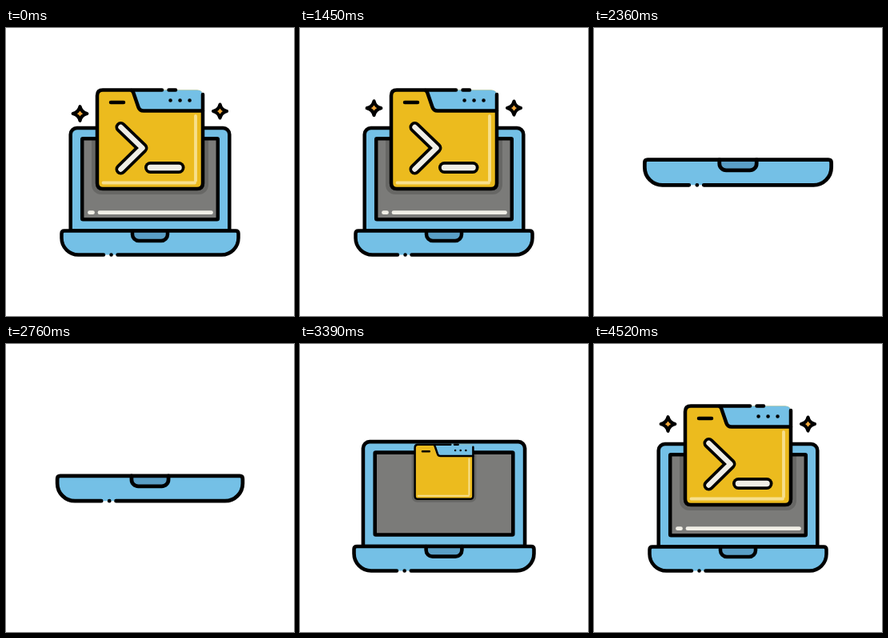
Write an HTML page with a canvas that moves like this. It is 360 px wide and 360 px high and loops after 4.55 s.

```html
<!DOCTYPE html>
<html lang="en">
<head>
<meta charset="utf-8">
<title>Laptop terminal</title>
<style>
html, body { margin: 0; width: 100%; height: 100%; overflow: hidden; background: #fff; }
canvas { display: block; width: 360px; height: 360px; }
</style>
</head>
<body>
<canvas id="stage" width="360" height="360"></canvas>
<script>
const ctx = document.getElementById('stage').getContext('2d');
const LOOP = 4550, LINE = 4.5;
const BLACK = '#000', BLUE = '#74c0e6', YELLOW = '#ecbb1e', GREY = '#7b7b79',
      SHADE = '#676765', CREAM = '#f0eee6', GLOW = '#f7df8c';

const baseTop = 'V257Q69.500 253.500 73 253.500H287Q290.500 253.500 290.500 257V262.500A21 21 0 0 1 269.500 283.500';
const base = new Path2D(`M90.500 283.500A21 21 0 0 1 69.500 262.500${baseTop}Z`);
const baseLine = new Path2D(`M122 283.500H90.500A21 21 0 0 1 69.500 262.500${baseTop}H139.500M131.500 283.500H131.600`);
const notch = new Path2D('M158 253.500V258A8 8 0 0 0 166 266H194A8 8 0 0 0 202 258V253.500');
const pane = new Path2D('M121 77.500H239Q246 77.500 246 84.500V194Q246 201 239 201H121Q114 201 114 194V84.500Q114 77.500 121 77.500Z');
const paneLine = new Path2D('M195 77.500H121Q114 77.500 114 84.500V194Q114 201 121 201H239Q246 201 246 194V83M203.500 77.500H212');
const tab = new Path2D('M157 77.500H239Q246 77.500 246 84.500V103.500H172Q167 103.500 165.500 99L160 83Q159 79 157 77.500Z');
const tabLine = new Path2D('M157 78Q159 79 160 83L165.500 99Q167 103.500 172 103.500H246M131 93H147');
const dots = new Path2D('M205.500 90.500H205.600M217.500 90.500H217.600M229.500 90.500H229.600');
const glow = new Path2D('M121.500 193.500H236M237 110V191');
const chevron = new Path2D('M143.500 124L170.500 150L143.500 176.500');
const cursor = new Path2D('M180.500 174.500H216');
const starShape = new Path2D('M0-8.800Q1.700-1.700 8.800 0Q1.700 1.700 0 8.800Q-1.700 1.700-8.800 0Q-1.700-1.700 0-8.800Z');

const ramp = (t, a, b) => Math.min(1, Math.max(0, (t - a) / (b - a)));
const smooth = u => u * u * (3 - 2 * u);
const ease = (t, a, b) => smooth(ramp(t, a, b));

// Eased value through [time, value] keys
function keys(t, list) {
  let value = list[0][1];
  for (let i = 1; i < list.length; i++)
    value += (list[i][1] - list[i - 1][1]) * ease(t, list[i - 1][0], list[i][0]);
  return value;
}

function fill(path, color) {
  ctx.fillStyle = color;
  ctx.fill(path);
}

function stroke(path, color = BLACK, width = LINE) {
  ctx.strokeStyle = color;
  ctx.lineWidth = width;
  ctx.stroke(path);
}

function roundBox(x, y, w, h, r) {
  const p = new Path2D();
  p.roundRect(x, y, w, h, r);
  return p;
}

function scaleAt(x, y, s) {
  ctx.translate(x, y);
  ctx.scale(s, s);
  ctx.translate(-x, -y);
}

function drawScreen(t, open, paneScale) {
  if (open < 0.02) return;
  const up = y => 253.5 - (253.5 - y) * open;
  const r = Math.max(2, 8 * open);
  const lid = roundBox(80.7, up(125), 198.6, 253.5 - up(125), [r, r, 0, 0]);
  const glass = roundBox(95.2, up(138.2), 169.6, up(239.3) - up(138.2), 1);
  fill(lid, BLUE);
  stroke(lid);
  fill(glass, GREY);

  ctx.save();
  ctx.clip(glass);
  if (paneScale > 0) {
    ctx.save();
    ctx.setTransform(1, 0, 0, 1, 0, 0);
    scaleAt(180, 185, paneScale);
    fill(roundBox(107, 75, 146, 133, 12), SHADE);
    ctx.restore();
  }
  const grow = t < 2500 ? 1 : ease(t, 3620, 4100);
  if (grow > 0) {
    const y = up(230.7), left = 256.5 - 139.5 * grow;
    stroke(new Path2D(`M256.5 ${y}H${left}`), CREAM, 4.8);
    if (grow > 0.95) stroke(new Path2D(`M104.5 ${y}H108.5`), CREAM, 4.8);
  }
  ctx.restore();
  stroke(glass);
}

function drawLaptop(t, paneScale) {
  const rise = ease(t, 2150, 2355) - ease(t, 2930, 3345);
  const open = 1 - ease(t, 2020, 2200) + ease(t, 2930, 3345);
  const scale = keys(t, [[1460, 1], [1680, 1.107], [2150, 1], [2250, 1], [2550, 1.18],
                         [2870, 1], [3200, 1], [3380, 1.018], [3560, 1]]);
  ctx.save();
  ctx.translate(0, -88 * rise);
  scaleAt(180, 285 - 16.5 * rise, scale);
  drawScreen(t, open, paneScale);
  fill(base, BLUE);
  fill(notch, '#5a9fc6');
  stroke(notch);
  stroke(baseLine);
  ctx.restore();
}

function drawGlyph(path, length, shown, outer, inner) {
  if (shown <= 0) return;
  ctx.setLineDash([length * shown, 200]);
  stroke(path, BLACK, outer);
  stroke(path, CREAM, inner);
  ctx.setLineDash([]);
}

function drawPane(t, scale) {
  if (scale <= 0) return;
  ctx.save();
  scaleAt(180, 185, scale);
  fill(pane, YELLOW);
  fill(tab, BLUE);
  stroke(glow, GLOW, 3.8);
  stroke(tabLine);
  stroke(dots);
  stroke(paneLine);
  const typed = t < 2500;
  drawGlyph(chevron, 77, typed ? 1 : ease(t, 3820, 4100), 14, 6.5);
  drawGlyph(cursor, 36, typed ? 1 : ease(t, 4060, 4340), 15, 7.5);
  ctx.restore();
}

function drawStar(x, y, size, turn) {
  if (size <= 0) return;
  ctx.save();
  ctx.translate(x, y);
  ctx.rotate(turn);
  ctx.scale(size, size);
  fill(starShape, '#f2a93b');
  stroke(starShape, BLACK, 4.2);
  ctx.restore();
}

function drawStars(t) {
  const bob = Math.cos(t / 1000 * 2 * Math.PI);
  const left = 1 - ease(t, 1640, 1860) + ease(t, 3480, 3800);
  const right = 1 - ease(t, 1860, 2060) + ease(t, 3580, 3860);
  drawStar(92.5, 103.5 + 3.5 * bob, left, (1 - left) * 2.5);
  drawStar(267.5, 102 + 2 * bob + (t > 2500 ? 10 * (1 - right) : 0), right * 0.97, (1 - right) * 0.6);
}

function draw(t) {
  ctx.setTransform(1, 0, 0, 1, 0, 0);
  ctx.fillStyle = '#fff';
  ctx.fillRect(0, 0, 360, 360);
  ctx.lineCap = ctx.lineJoin = 'round';
  const paneScale = t < 2500
    ? 1 - ramp(t, 1670, 2090) ** 3
    : keys(t, [[3260, 0], [3520, 1.09], [3720, 0.93], [3900, 1]]);
  drawLaptop(t, paneScale);
  drawPane(t, paneScale);
  drawStars(t);
}

const start = performance.now();
function frame() {
  draw((performance.now() - start) % LOOP);
  requestAnimationFrame(frame);
}
frame();
</script>
</body>
</html>
```
